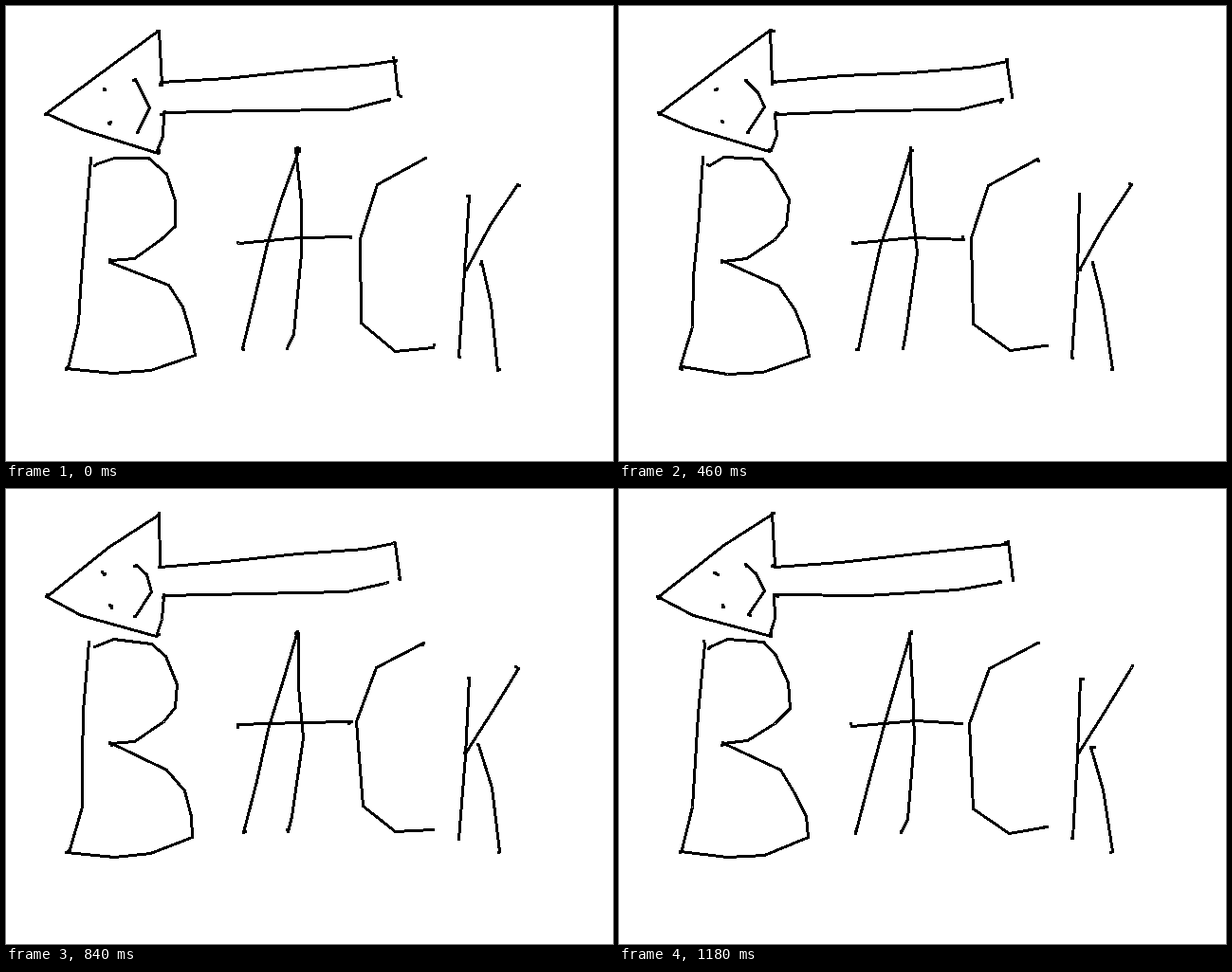
These frames come from a looping animation (640x480 px, 1.2 s). An HTML page:

```html
<!DOCTYPE html>
<html lang="en">
<head>
<meta charset="utf-8">
<title>Back</title>
<style>
  html, body { margin: 0; width: 100%; height: 100%; overflow: hidden; background: #fff; }
  svg { display: block; width: 640px; height: 480px; }
  path { fill: none; stroke: #000; stroke-width: 3; stroke-linecap: round; stroke-linejoin: round; }
</style>
</head>
<body>
<svg viewBox="-0.5 -0.5 640 480" role="img" aria-label="Back" shape-rendering="crispEdges"><path id="ink"/></svg>
<script>
const LOOP = 1200, STEP = 20, WOBBLE = 2, MAX_EDGE = 100;

// Key points of each pen stroke; strokes are separated by "|".
const shapes = {
  arrow: "161,26 109,61 42,113|161,26 162,81|162,81 378,63 409,57|409,56 414,94|" +
         "402,99 358,108 166,113|165,113 164,135 160,153|42,113 79,131 160,153",
  face: "102,88|109,123|135,79 146,91 152,106 137,132",
  B: "89,161 82,235 78,336 65,382|95,167 112,159 151,161 167,177 180,205 178,230 165,245 135,265 109,268|" +
     "109,268 169,296 186,319 196,345 198,368 151,385 113,387 65,382",
  A: "307,151 276,252 250,362|307,151 312,262 303,346 298,360|245,249 311,245 362,245",
  C: "441,162 389,189 371,245 374,336 411,363 449,358",
  K: "487,200 482,280 478,369|539,187 484,278|499,271 510,315 519,383"
};

const parse = text => text.split("|").map(s => s.split(" ").map(p => p.split(",").map(Number)));

// Splits long edges and doubles both ends, so the wobble bends lines and hooks their tips.
function refine(points) {
  const out = [points[0]];
  points.forEach(([x, y], i) => {
    const [px, py] = points[Math.max(i - 1, 0)];
    const parts = Math.ceil(Math.hypot(x - px, y - py) / MAX_EDGE) || 1;
    for (let k = 1; k <= parts; k++) {
      out.push([px + (x - px) * k / parts, py + (y - py) * k / parts]);
    }
  });
  return [...out, points.at(-1)];
}

// Seeded generator, so each step always has the same wobble.
function random(seed) {
  let s = Math.imul(seed + 1, 0x9E3779B1);
  return () => {
    s = (s + 0x6D2B79F5) | 0;
    let t = Math.imul(s ^ (s >>> 15), 1 | s);
    t ^= t + Math.imul(t ^ (t >>> 7), 61 | t);
    return ((t ^ (t >>> 14)) >>> 0) / 4294967296;
  };
}

const strokes = Object.values(shapes).flatMap(parse).map(refine);
const ink = document.getElementById("ink");

function draw(time) {
  const next = random(Math.floor((time % LOOP) / STEP));
  const shake = v => Math.round(v + (next() * 2 - 1) * WOBBLE);
  ink.setAttribute("d", strokes.map(s => "M" + s.flat().map(shake).join(" ")).join(""));
}

function tick() {
  draw(performance.now());
  requestAnimationFrame(tick);
}
tick();
</script>
</body>
</html>
```
